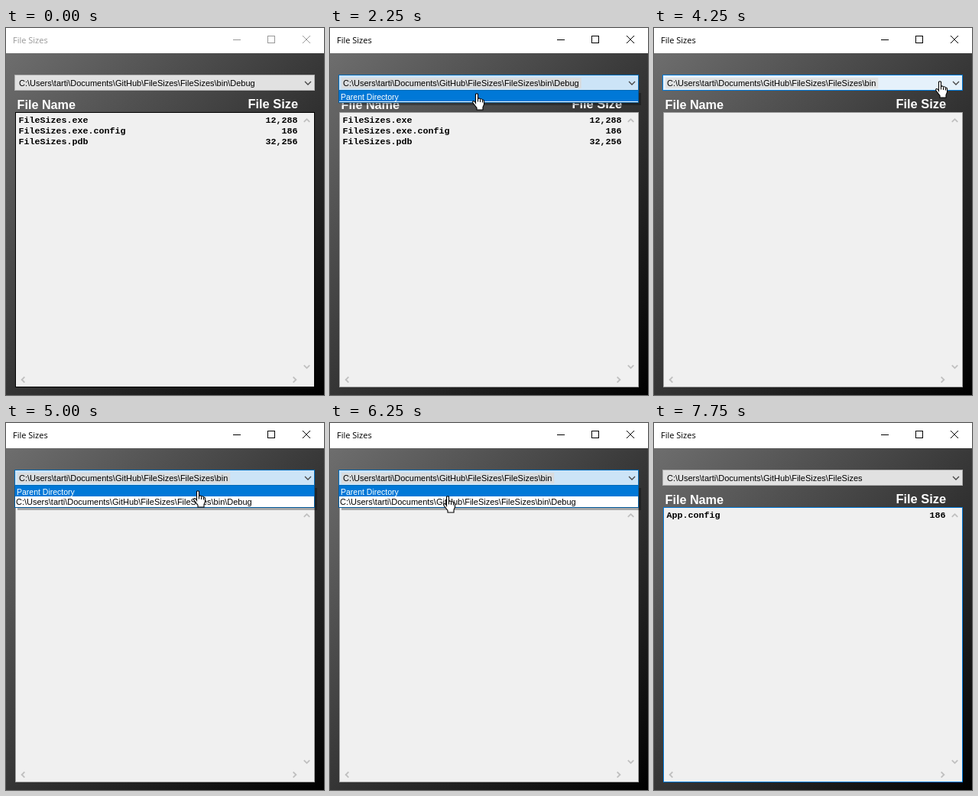
Write an HTML page with a canvas that moves like this. It is 416 px wide and 480 px high and loops after 8 s.

```html
<!DOCTYPE html>
<html lang="en">
<head>
<meta charset="utf-8">
<title>File Sizes</title>
<style>
html, body { margin: 0; width: 100%; height: 100%; overflow: hidden; background: #222; }
canvas { display: block; width: 416px; height: 480px; }
</style>
</head>
<body>
<canvas id="stage" width="416" height="480"></canvas>
<script>
const LOOP = 8000;
const SANS = '"Liberation Sans", Arial, sans-serif';
const MONO = 'bold 11.667px "Liberation Mono", "Courier New", monospace';
const ctx = document.getElementById('stage').getContext('2d');

const project = 'C:\\Users\\tarti\\Documents\\GitHub\\FileSizes\\FileSizes';
const dirs = {
  debug: { path: project + '\\bin\\Debug', children: [],
    files: [['FileSizes.exe', '12,288'], ['FileSizes.exe.config', '186'], ['FileSizes.pdb', '32,256']] },
  bin: { path: project + '\\bin', children: [project + '\\bin\\Debug'], files: [] },
  root: { path: project, children: [], files: [['App.config', '186']] }
};

const combos = {
  idle: { fill: '#e1e1e1', edge: '#adadad' },
  hot: { fill: '#e5f1fb', edge: '#0078d7', mark: '#e0e2e3' },
  open: { fill: '#cce4f7', edge: '#0068b5', mark: '#d9dcde' }
};

// Each step keeps the values of the one before it.
const steps = [
  { t: 0, dir: 'debug', combo: 'idle', active: false, edge: '#000', cursor: null },
  { t: 1000, combo: 'hot', cursor: ['hand', 402, 79] },
  { t: 1250, active: true, edge: '#a0a0a0', cursor: ['hand', 398, 73] },
  { t: 1500, cursor: ['hand', 396, 71] },
  { t: 1750, combo: 'open', cursor: ['hand', 376, 73] },
  { t: 2000, cursor: ['hand', 246, 84] },
  { t: 2250, cursor: ['hand', 191, 85] },
  { t: 2750, cursor: ['hand', 190, 88] },
  { t: 3000, dir: 'bin', combo: 'hot', cursor: ['hand', 206, 79] },
  { t: 3250, cursor: ['hand', 268, 72] },
  { t: 3500, cursor: ['hand', 330, 69] },
  { t: 3750, cursor: ['hand', 364, 68] },
  { t: 4000, cursor: ['hand', 374, 68] },
  { t: 4250, cursor: ['hand', 373, 69] },
  { t: 4500, combo: 'open', cursor: ['hand', 340, 76] },
  { t: 5000, cursor: ['hand', 250, 88] },
  { t: 5250, cursor: ['hand', 186, 93] },
  { t: 5750, cursor: ['hand', 168, 95] },
  { t: 6000, cursor: ['hand', 160, 95] },
  { t: 6250, cursor: ['hand', 153, 95] },
  { t: 6500, dir: 'root', combo: 'hot', cursor: ['hand', 155, 79] },
  { t: 6750, combo: 'idle', cursor: ['arrow', 188, 200] },
  { t: 7000, edge: '#0078d7', cursor: ['arrow', 206, 262] },
  { t: 7250, cursor: ['arrow', 232, 352] },
  { t: 7500, cursor: ['arrow', 256, 452] },
  { t: 7750, cursor: null }
];

function rect(x, y, w, h, fill) {
  ctx.fillStyle = fill;
  ctx.fillRect(x, y, w, h);
}

function frame(x, y, w, h, fill, edge) {
  rect(x, y, w, h, edge);
  rect(x + 1, y + 1, w - 2, h - 2, fill);
}

function text(str, x, y, font, color, align = 'left') {
  ctx.font = font;
  ctx.fillStyle = color;
  ctx.textAlign = align;
  ctx.fillText(str, x, y);
}

function line(points, color, width = 1) {
  ctx.beginPath();
  points.forEach(([x, y]) => ctx.lineTo(x, y));
  ctx.strokeStyle = color;
  ctx.lineWidth = width;
  ctx.stroke();
}

function chevron(x, y, angle, color, width, size) {
  ctx.save();
  ctx.translate(x, y);
  ctx.rotate(angle);
  line([[-size, -size / 2], [0, size / 2], [size, -size / 2]], color, width);
  ctx.restore();
}

function drawWindow(active) {
  const back = ctx.createLinearGradient(-8, 40, 424, 473);
  back.addColorStop(0, '#6e6e6e');
  back.addColorStop(1, '#000');
  rect(0, 33, 416, 447, back);
  rect(0, 0, 416, 33, '#fff');
  const ink = active ? '#000' : '#999';
  text('File Sizes', 9, 20, '11px "Open Sans", "Noto Sans", sans-serif', ink);
  line([[297, 15.5], [307, 15.5]], ink);
  ctx.strokeRect(342.5, 10.5, 9, 9);
  line([[388, 10], [398, 20]], ink);
  line([[398, 10], [388, 20]], ink);
  text('File Name', 14.5, 106, 'bold 16.2px ' + SANS, '#fff');
  text('File Size', 316.5, 105, 'bold 16.4px ' + SANS, '#fff');
}

function drawList(files, edge) {
  frame(12, 110, 392, 360, '#f0f0f0', edge);
  files.forEach(([name, size], i) => {
    text(name, 16.5, 124 + 14 * i, MONO, '#000');
    text(size, 381.5, 124 + 14 * i, MONO, '#000', 'right');
  });
  const arrows = [[393, 121, Math.PI], [393, 443, 0], [22, 460, Math.PI / 2], [377, 460, -Math.PI / 2]];
  arrows.forEach(([x, y, a]) => chevron(x + 0.5, y, a, '#bfbfbf', 1.8, 3.7));
}

function drawCombo(dir, state) {
  const look = combos[state];
  const font = '11px ' + SANS;
  frame(11, 61, 393, 21, look.fill, look.edge);
  ctx.font = font;
  if (look.mark) rect(15, 65, ctx.measureText(dir.path).width + 5, 14, look.mark);
  text(dir.path, 17, 76, font, '#000');
  chevron(395, 72, 0, '#444', 1.3, 4);
  if (state === 'open') drawMenu(dir.children, font);
}

function drawMenu(children, font) {
  const h = 16 + 13 * children.length;
  rect(15, 85, 392, h, 'rgba(0,0,0,.3)');
  frame(11, 82, 393, h, '#fff', '#00599c');
  rect(12, 82, 391, 14, '#0078d7');
  text('Parent Directory', 14, 94, '10.5px ' + SANS, '#fff');
  children.forEach((path, i) => text(path, 13, 107 + 13 * i, font, '#000'));
}

const shapes = {
  hand: new Path2D('M-1 12.5V1Q.5-.6 2 1V7Q4 5.6 5 7.6Q7 6.6 8 8.6Q10 8 10 10.5V14.5L8.5 18V21.5H.5V19L-4.5 12.5Q-5.5 10 -3.5 10Q-2 10.4 -1 12.5Z'),
  arrow: new Path2D('M0 0V16.5L3.8 13L6.2 18.6L8.8 17.5L6.4 12H11.6Z')
};
const knuckles = new Path2D('M2 7V11M5 8V11.5M8 9V12');

function drawCursor([kind, x, y]) {
  ctx.save();
  ctx.translate(x + 0.5, y + 0.5);
  ctx.fillStyle = '#fff';
  ctx.strokeStyle = '#000';
  ctx.lineWidth = 1.1;
  ctx.fill(shapes[kind]);
  ctx.stroke(shapes[kind]);
  if (kind === 'hand') ctx.stroke(knuckles);
  ctx.restore();
}

function draw(now) {
  const t = now % LOOP;
  const view = Object.assign({}, ...steps.filter(s => s.t <= t));
  const dir = dirs[view.dir];
  drawWindow(view.active);
  drawList(dir.files, view.edge);
  drawCombo(dir, view.combo);
  if (view.cursor) drawCursor(view.cursor);
}

let start;
function tick(now) {
  start ??= now;
  draw(Math.max(0, now - start));
  requestAnimationFrame(tick);
}
draw(0);
requestAnimationFrame(tick);
</script>
</body>
</html>
```
